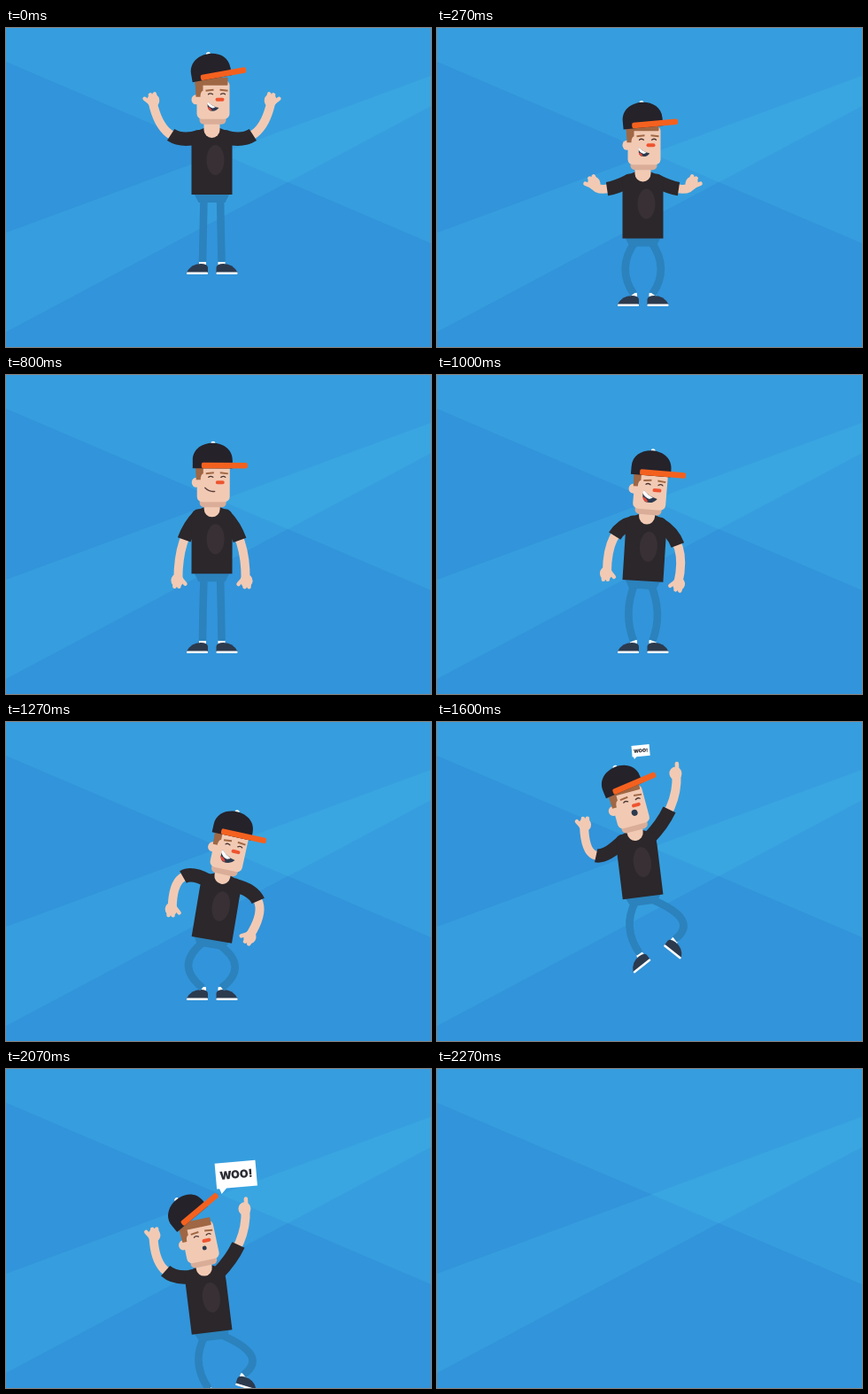
These frames come from a looping animation (480 px wide and 360 px high, 2.47 s). An HTML page with a canvas:

```html
<!DOCTYPE html>
<html lang="en">
<head>
<meta charset="utf-8">
<title>Jump</title>
<style>
html, body { margin: 0; height: 100%; overflow: hidden; background: #3294da; }
canvas { display: block; }
</style>
</head>
<body>
<canvas id="stage" width="480" height="360"></canvas>
<script>
const ctx = document.getElementById('stage').getContext('2d');
const { PI, sin, cos, min, max, atan2 } = Math;
const LOOP = 2470, GONE = 2250, LAND = 200, SETTLED = 500, JUMP = 1340, APEX = 1690;
const CENTER = 232.5, STAND = 223, LOW = 246, HIGH = 193, GROUND = 301, LEG = 78, TORSO = 74;
const SKIN = '#f2cab4', SHADE = '#d9ad98', SHIRT = '#2b272b', JEANS = '#2b82bc';
const NAVY = '#2c3a4e', ORANGE = '#f4611f', HAIR = '#9f6744', WHITE = '#fff';

// Arm poses: elbow x, y and hand x, y from the neck.
const RAISED = [56, 22, 67, -30], HANGING = [38, 34, 38, 82];
const COILED = { left: [-57, -17, -58, 36], right: [61, 23, 30, 69] };
const CHEERING = { left: [-55, 18, -57, -34], right: [49, -26, 47, -64] };

const rad = deg => deg * PI / 180;
const lerp = (a, b, k) => a + (b - a) * k;
const mix = (a, b, k) => a.map((v, i) => lerp(v, b[i], k));
const unit = u => min(1, max(0, u));
const ramp = (t, start, length) => {
  const u = unit((t - start) / length);
  return u * u * (3 - 2 * u);
};

function fill(path, color) {
  ctx.fillStyle = color;
  ctx.fill(new Path2D(path));
}
function line(path, color, width, cap = 'round') {
  ctx.strokeStyle = color;
  ctx.lineWidth = width;
  ctx.lineCap = cap;
  ctx.stroke(new Path2D(path));
}
function oval(x, y, rx, ry, color) {
  ctx.fillStyle = color;
  ctx.beginPath();
  ctx.ellipse(x, y, rx, ry, 0, 0, 7);
  ctx.fill();
}
function box(x, y, w, h, r, color) {
  ctx.fillStyle = color;
  ctx.beginPath();
  ctx.roundRect(x, y, w, h, r);
  ctx.fill();
}
function at(x, y, deg, draw, sx = 1, sy = sx) {
  ctx.save();
  ctx.translate(x, y);
  ctx.rotate(rad(deg));
  ctx.scale(sx, sy);
  draw();
  ctx.restore();
}
function place([ox, oy], deg, x, y) {
  const c = cos(rad(deg)), s = sin(rad(deg));
  return [ox + x * c - y * s, oy + x * s + y * c];
}

function background() {
  box(0, 0, 480, 360, 0, '#3294da');
  const light = 'rgba(70,193,233,.2)';
  fill('M0 38L480 243V0H0Z', light);
  fill('M0 231L480 54V88L0 343Z', light);
}

// Fall, springy landing, slow crouch, then a leap that falls faster than it rose.
function pelvisHeight(t, crouch) {
  if (t < LAND) return lerp(187, STAND, (t / LAND) ** 2);
  if (t < JUMP) {
    const u = unit((t - LAND) / (SETTLED - LAND));
    return lerp(STAND, LOW, crouch) + 26 * sin(PI * u) * (1 - u);
  }
  const gravity = t < APEX ? (LOW - HIGH) / (APEX - JUMP) ** 2 : .00071;
  return HIGH + gravity * (t - APEX) ** 2;
}

function armPose(t, side, crouch, leap) {
  const name = side < 0 ? 'left' : 'right';
  const mirror = ([ex, ey, hx, hy]) => [side * ex, ey, side * hx, hy];
  const lowered = mix(mirror(RAISED), mirror(HANGING), ramp(t, 100, 400));
  const lift = side < 0 ? ramp(t, JUMP, 460) : leap;
  const pose = mix(mix(lowered, COILED[name], crouch), CHEERING[name], lift);
  const swing = side * 35 * sin(PI * leap);
  pose[0] += swing / 2;
  pose[2] += swing;
  if (side < 0) pose[1] += 50 * sin(PI * lift);
  return pose;
}

function arm(side, shoulder, neck, [ex, ey, hx, hy], pointing) {
  const elbow = [neck[0] + ex, neck[1] + ey], hand = [neck[0] + hx, neck[1] + hy];
  line(`M${shoulder}Q${elbow} ${hand}`, SKIN, 10);
  const k = .46, bend = mix(shoulder, elbow, k), cuff = mix(bend, mix(elbow, hand, k), k);
  line(`M${shoulder}Q${bend} ${cuff}`, SHIRT, 15.5, 'butt');
  oval(...shoulder, 8, 8, SHIRT);
  const heading = atan2(hand[1] - elbow[1], hand[0] - elbow[0]) * 180 / PI + 90;
  at(...hand, heading, () => {
    oval(-1, -1, 7, 7.5, SKIN);
    if (pointing) line('M1 -4V-12', SKIN, 4.5);
    else line('M3 1L8 -5M-4 -4L-4 -8M1 -5V-8', SKIN, 4.5);
  }, side, 1);
}

function leg(side, hip, pelvisY, ankle, reach, turn, grounded) {
  const y = grounded ? min(GROUND, pelvisY + reach) : pelvisY + reach;
  const bow = side * 1.5 * max(0, LEG - (y - pelvisY));
  const knee = mix(hip, [ankle, y], .5);
  at(ankle, y, side * turn, () => {
    box(-4, -2, 8, 5, 1, WHITE);
    fill('M6 11V5Q5 1 -2 1Q-13 1 -18 11Z', NAVY);
    box(-18, 10.5, 24, 2.5, 1, WHITE);
  }, -side, 1);
  line(`M${hip}Q${knee[0] + bow} ${knee[1]} ${ankle} ${y - 1}`, JEANS, 8.5, 'butt');
}

function mouth(t, laugh) {
  if (t > 1420) {
    const r = lerp(3.5, 2.4, ramp(t, 1600, 200));
    oval(5, -20, r, r, NAVY);
  } else if (laugh < .15) {
    line('M-8 -22Q-3 -17 3 -18', '#5a3f3c', 1.3);
  } else {
    at(1, -20, 22, () => {
      fill('M-9 -4Q0 0 9 -2Q7 6 -2 7Q-8 5 -9 -4Z', NAVY);
      fill('M-9 -4Q-2 -1 4 -1L1 2Q-5 3 -9 -1Z', WHITE);
      fill('M-7 3Q-2 2 1 6Q-4 8 -7 3Z', '#e2493a');
    }, .4 + .6 * laugh);
  }
}

function head(t, capTilt, lift, laugh) {
  ctx.translate(0, -lift * .7);
  box(-14, -14, 30, 14, 5, SHADE);
  oval(-18, -28, 5, 5.5, SKIN);
  box(-17, -50, 37, 44, 6, SKIN);
  box(-19, -53, 37, 9, 1, HAIR);
  fill('M-19 -48H-10V-38Q-13 -37 -13 -31H-18Z', HAIR);
  line('M-7 -38L2 -39M9 -39L18 -38', HAIR, 2, 'butt');
  line('M-4 -34Q-2 -36 1 -34M10 -34Q13 -36 15 -34', '#4a3431', 1.3);
  box(4, -30, 10, 4, 2, '#ee5430');
  mouth(t, laugh);
  at(-22, -45 - lift * .6, capTilt, () => {
    oval(23, -27.5, 2.5, 2, WHITE);
    fill('M0 1V-8C0 -34 45 -34 45 -8V1Z', '#25222a');
    box(10, -5.5, 52, 6.5, 2, ORANGE);
  });
}

function bubble(t, pelvisY) {
  at(223 + (t - 1600) * .044, pelvisY - 154, -5, () => {
    fill('M-5 -36H41V-7H6L0 -1L-2 -7H-5Z', WHITE);
    ctx.fillStyle = '#2b2b33';
    ctx.font = '900 12.5px Inter, sans-serif';
    ctx.textAlign = 'center';
    ctx.textBaseline = 'middle';
    ctx.fillText('WOO!', 18, -21);
  }, ramp(t, 1500, 220));
}

function person(t) {
  const landed = ramp(t, 100, 350), crouch = ramp(t, 760, 590), leap = ramp(t, JUMP, 260);
  const kick = ramp(t, 1380, 180), drop = ramp(t, 1600, 270);
  const y = pelvisHeight(t, crouch);
  const lean = lerp(10 * crouch, -7, leap), tilt = lerp(13 * crouch, -15 + 3 * drop, leap);
  const capTilt = -10 * (1 - landed) - 8 * leap - 20 * drop;
  const laugh = max(.6 * (1 - ramp(t, 250, 200)), ramp(t, 760, 240));
  const neck = place([CENTER, y], lean, 0, -TORSO);
  const onBody = (px, py) => place(neck, lean, px, py);

  const grounded = t < 1480, turn = kick * lerp(38, 17, drop);
  leg(-1, onBody(-9, 79), y, 222 + 7 * kick, LEG - 12 * kick, turn, grounded);
  leg(1, onBody(9.5, 79), y, 243.5 + 25 * kick, LEG - 28 * kick, turn, grounded);
  for (const side of [-1, 1]) {
    arm(side, onBody(15 * side, 10), neck, armPose(t, side, crouch, leap), side > 0 && t > 1540);
  }
  at(...neck, lean, () => {
    fill('M-21 72H21L15 84H-15Z', JEANS);
    fill('M-9 0H9L19 4Q23 9 23 18V75H-23V18Q-23 9 -19 4Z', SHIRT);
    oval(4, 36, 10, 17, '#383035');
    box(-9, -10, 18, 21, [0, 0, 9, 9], SKIN);
  });
  at(...neck, tilt, () => head(t, capTilt, 6 * (1 - landed), laugh));
  if (t > 1500) bubble(t, y);
}

function frame() {
  const t = performance.now() % LOOP;
  background();
  if (t < GONE) person(t);
  requestAnimationFrame(frame);
}
frame();
</script>
</body>
</html>
```
